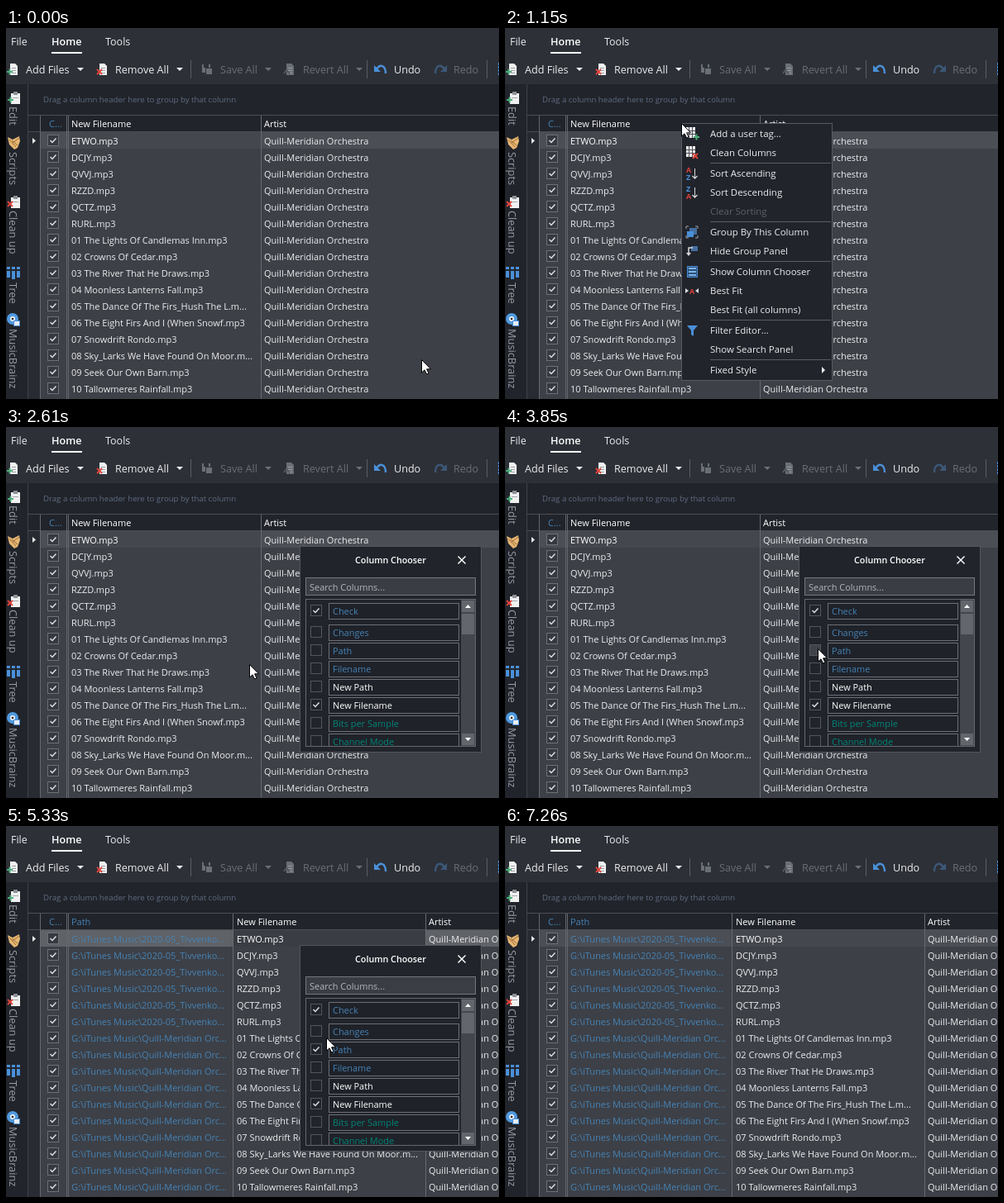
Write an HTML page with a canvas that moves like this. It is 596 px wide and 449 px high and loops after 7490 ms.

```html
<!DOCTYPE html>
<html lang="en">
<head>
<meta charset="utf-8">
<title>Column chooser</title>
<style>
html, body { margin: 0; width: 100%; height: 100%; overflow: hidden; background: #2d3037; }
canvas { display: block; width: 596px; height: 449px; }
</style>
</head>
<body>
<canvas id="stage" width="596" height="449"></canvas>
<script>
const ctx = document.getElementById('stage').getContext('2d');
const LOOP = 7490;
const C = {
  ribbon: '#2d3037', dark: '#21242b', row: '#3d4047', hot: '#4b4e55', line: '#65686e',
  text: '#ececee', white: '#ffffff', dim: '#6a6e75', steel: '#4682b4', teal: '#008577',
  blue: '#4a90d9', red: '#e0443c', green: '#4fae7c'
};

// ---------- drawing helpers ----------
function rect(x, y, w, h, color) {
  ctx.fillStyle = color;
  ctx.fillRect(x, y, w, h);
}
function box(x, y, w, h, fill, border) {
  rect(x, y, w, h, border);
  rect(x + 1, y + 1, w - 2, h - 2, fill);
}
function text(s, x, y, size = 11, color = C.text, weight = 400) {
  ctx.font = `${weight} ${size}px "Open Sans", "Noto Sans", sans-serif`;
  ctx.fillStyle = color;
  ctx.fillText(s, x, y);
}
function trace(points) {
  ctx.beginPath();
  points.forEach(([x, y], i) => i ? ctx.lineTo(x, y) : ctx.moveTo(x, y));
}
function stroke(points, color, width = 1) {
  trace(points);
  ctx.strokeStyle = color;
  ctx.lineWidth = width;
  ctx.stroke();
}
function fill(points, color) {
  trace(points);
  ctx.fillStyle = color;
  ctx.fill();
}
function disc(x, y, r, color) {
  ctx.beginPath();
  ctx.arc(x, y, r, 0, Math.PI * 2);
  ctx.fillStyle = color;
  ctx.fill();
}
function at(x, y, draw) {
  ctx.save();
  ctx.translate(x, y);
  draw();
  ctx.restore();
}
function clip(x, y, w, h, draw) {
  ctx.save();
  ctx.beginPath();
  ctx.rect(x, y, w, h);
  ctx.clip();
  draw();
  ctx.restore();
}
function faded(alpha, draw) {
  if (alpha <= 0) return;
  ctx.save();
  ctx.globalAlpha = alpha;
  draw();
  ctx.restore();
}
const plus = (x, y, c) => { rect(x - 3, y - 1, 7, 2, c); rect(x - .5, y - 3.5, 2, 7, c); };
const cross = (x, y, r, c, w = 2) => {
  stroke([[x - r, y - r], [x + r, y + r]], c, w);
  stroke([[x + r, y - r], [x - r, y + r]], c, w);
};
const dropArrow = (x, y, c) => fill([[x - 4, y - 2], [x + 4, y - 2], [x, y + 2]], c);
function checkbox(x, y, checked, back, border) {
  box(x, y, 14, 14, back, border);
  if (checked) stroke([[x + 3.5, y + 7], [x + 6, y + 9.5], [x + 10.5, y + 4.5]], '#dcdde0', 1.5);
}

// ---------- timeline ----------
// Progress of a move shown in n evenly spaced steps, the first one at t0.
function steps(t, t0, t1, n) {
  if (t < t0) return 0;
  if (n === 1 || t >= t1) return 1;
  return (Math.floor((t - t0) / (t1 - t0) * (n - 1) + 0.05) + 1) / n;
}
const smooth = p => p * p * (3 - 2 * p);

// start, end, steps, x, y
const MOVES = [
  [70, 770, 10, 213, 115],
  [1610, 1920, 5, 293, 275],
  [1990, 2070, 2, 294, 287],
  [3010, 3320, 5, 400, 256],
  [3470, 3700, 4, 380, 281],
  [3770, 3850, 2, 378, 268],
  [5330, 5330, 1, 387, 256],
  [5410, 6020, 9, 556, 163],
  [6100, 6100, 1, 557, 164]
];
function pointer(t) {
  let x = 502, y = 401;
  for (const [t0, t1, n, tx, ty] of MOVES) {
    const p = smooth(steps(t, t0, t1, n));
    x += (tx - x) * p;
    y += (ty - y) * p;
  }
  return { x: Math.round(x), y: Math.round(y) };
}

// ---------- ribbon ----------
function pageIcon(mark, color) {
  fill([[4, 1], [10, 1], [13, 4], [13, 15], [4, 15]], color);
  [6, 9, 12].forEach(y => rect(6, y, 5, 1, '#9a9da3'));
  mark();
}
function arrowIcon(color) {
  ctx.beginPath();
  ctx.moveTo(3, 8);
  ctx.bezierCurveTo(7, 1, 14, 3, 14, 13);
  ctx.strokeStyle = color;
  ctx.lineWidth = 2.4;
  ctx.stroke();
  fill([[0, 3], [0, 11], [8, 11]], color);
}
function diskIcon(color) {
  rect(2, 2, 10, 10, color);
  rect(4, 2, 6, 4, C.ribbon);
  box(6, 6, 9, 9, color, C.ribbon);
}
function ribbon() {
  rect(0, 0, 596, 68, C.ribbon);
  text('File', 6, 21, 12.4);
  text('Home', 55, 21, 12.6, C.white, 600);
  text('Tools', 120, 21, 12.5);
  rect(55, 29, 37, 2, C.white);
  at(1, 42, () => pageIcon(() => plus(3, 11, C.green), '#f2f2f2'));
  at(109, 42, () => pageIcon(() => cross(4, 11, 3, C.red), '#f2f2f2'));
  at(235, 42, () => diskIcon(C.dim));
  at(335, 42, () => pageIcon(() => stroke([[1, 13], [4, 9], [8, 13]], '#55585f', 2), C.dim));
  at(445, 42, () => arrowIcon(C.blue));
  at(533, 42, () => { ctx.scale(-1, 1); arrowIcon('#3c5878'); });
  [['Add Files', 24, 90, C.text], ['Remove All', 132, 210, C.text],
   ['Save All', 259, 317, C.dim], ['Revert All', 359, 427, C.dim],
   ['Undo', 469, 0, C.text], ['Redo', 541, 0, C.dim]].forEach(([s, x, arrow, c]) => {
    text(s, x, 55, 12.6, c);
    if (arrow) dropArrow(arrow, 50, c);
  });
  [223, 436, 581].forEach(x => rect(x, 39, 1, 22, '#5a5d63'));
  for (let y = 42; y < 58; y += 4) rect(595, y, 1, 3, C.blue);
}

// ---------- sidebar ----------
function clipboard(y, mark) {
  rect(6, y + 2, 11, 13, '#f0f0f0');
  rect(9, y, 5, 4, '#8d9096');
  rect(8, y + 7, 7, 1, '#a5a8ad');
  mark(5, y + 10);
}
function sidebar() {
  rect(0, 68, 26, 381, C.dark);
  rect(26, 68, 1, 381, '#3f4249');
  clipboard(77, (x, y) => plus(x, y, C.green));
  clipboard(203, (x, y) => cross(x, y, 3, C.red));
  fill([[2, 132], [8, 135], [16, 131], [17, 137], [14, 145], [10, 147], [4, 141]], '#e6b673');
  [[4, 135, 12, 144], [7, 136, 14, 142], [16, 133, 8, 139]]
    .forEach(([a, b, c, d]) => stroke([[a, b], [c, d]], '#9a6d38'));
  [1, 7, 13].forEach((x, i) => {
    rect(x, 289, 4, 3, C.blue);
    rect(x, 294, 4, i === 1 ? 10 : 8, C.blue);
  });
  disc(8, 352, 7, '#4f9ae0');
  disc(8, 352, 3, '#f2f2f2');
  disc(8, 352, 1.3, C.dark);
  box(9, 354, 8, 7, '#e9eef4', C.blue);
  [['Edit', 95], ['Scripts', 150], ['Clean up', 221], ['Tree', 308], ['MusicBrainz', 364]]
    .forEach(([s, y]) => at(4, y, () => {
      ctx.rotate(Math.PI / 2);
      text(s, 0, 0, 12.8, '#999ca2');
    }));
}

// ---------- grid ----------
const ARTIST = 'Quill-Meridian Orchestra';
const FILES = [
  'ETWO.mp3', 'DCJY.mp3', 'QVVJ.mp3', 'RZZD.mp3', 'QCTZ.mp3', 'RURL.mp3',
  '01 The Lights Of Candlemas Inn.mp3', '02 Crowns Of Cedar.mp3',
  '03 The River That He Draws.mp3', '04 Moonless Lanterns Fall.mp3',
  '05 The Dance Of The Firs_Hush The L.m...', '06 The Eight Firs And I (When Snowf.mp3',
  '07 Snowdrift Rondo.mp3', '08 Sky_Larks We Have Found On Moor.m...',
  '09 Seek Our Own Barn.mp3', '10 Tallowmeres Rainfall.mp3'
];
const pathOf = i => 'G:\\iTunes Music\\' + (i < 6 ? '2020-05_Tivvenko...' : 'Quill-Meridian Orc...');

function grid(withPath, bright, headerHot) {
  rect(26, 68, 570, 381, C.dark);
  text('Drag a column header here to group by that column', 45, 90, 9.65, '#5f6b7f');
  rect(26, 105, 570, 1, '#4a4d54');
  const nameX = withPath ? 275 : 76, artistX = nameX + 232;
  if (headerHot) rect(nameX, 106, 231, 19, '#31343b');
  rect(26, 125, 570, 1, '#4a4d54');
  rect(42, 126, 554, 323, C.row);
  rect(27, 126, 14, 323, '#282b32');
  rect(42, 126, 554, 20, bright ? '#5f6267' : C.hot);
  rect(nameX, 126, 232, 20, bright ? '#3a3d44' : '#44474e');

  text('C...', 52, 120, 11, C.steel);
  if (withPath) text('Path', 79, 120, 11, C.steel);
  text('New Filename', nameX + (withPath ? 4 : 3), 120, 11, C.white);
  text('Artist', artistX + 4, 120, 11, C.white);

  FILES.forEach((name, i) => {
    const y = 141 + i * 20;
    checkbox(50, y - 12, true, '#363940', '#6d7076');
    if (withPath) clip(76, y - 14, 197, 20, () => text(pathOf(i), 79, y, 11, C.steel));
    clip(nameX, y - 14, 231, 20,
      () => text(name, nameX + (withPath ? 4 : 3), y, 11, i ? C.text : C.white));
    text(ARTIST, artistX + 4, y, 11);
  });
  [41, 73, 75, artistX].concat(withPath ? [274] : [])
    .forEach(x => rect(x, 106, 1, 343, C.line));
  fill([[32, 133], [36, 136.5], [32, 140]], C.text);
}

// ---------- context menu ----------
function tableIcon(mark) {
  rect(-7, -8, 11, 13, '#f2f2f2');
  [-4, 0].forEach(y => rect(-7, y, 11, 1, '#4a4d54'));
  [-4, 0].forEach(x => rect(x, -8, 1, 13, '#4a4d54'));
  mark();
}
function sortIcon(top, bottom) {
  text(top, -7, -1, 9, top === 'A' ? C.red : C.blue, 700);
  text(bottom, -7, 8, 9, bottom === 'A' ? C.red : C.blue, 700);
  rect(3, -6, 1, 12, '#d8d9dc');
  stroke([[0.5, 3], [3.5, 6], [6.5, 3]], '#d8d9dc', 1.3);
}
const ICONS = {
  add: () => tableIcon(() => plus(5, 4, C.green)),
  clean: () => tableIcon(() => cross(4, 4, 3, C.red)),
  asc: () => sortIcon('A', 'Z'),
  desc: () => sortIcon('Z', 'A'),
  group: () => {
    rect(-3, -5, 9, 8, '#456f9f');
    rect(-6, -1, 8, 7, C.blue);
    [[-7, -7, 1, 1], [7, -7, -1, 1], [-7, 7, 1, -1], [7, 7, -1, -1]].forEach(([x, y, a, b]) =>
      stroke([[x + 3 * a, y], [x, y], [x, y + 3 * b]], '#a0a3a8'));
  },
  hide: () => {
    rect(-1, -6, 8, 6, '#456f9f');
    stroke([[1, -4], [-4, -4], [-4, 4]], '#d8d9dc', 1.5);
    fill([[-7, 2], [-1, 2], [-4, 6]], '#d8d9dc');
  },
  list: () => {
    box(-6, -7, 13, 14, '#2d4f75', C.blue);
    [-4, 0, 4].forEach(y => rect(-4, y - 1, 9, 2, '#7bb4ee'));
  },
  fit: () => {
    text('A', -3, 3.5, 9, C.red, 700);
    fill([[-8, -3], [-4, 0], [-8, 3]], '#d8d9dc');
    fill([[8, -3], [4, 0], [8, 3]], '#d8d9dc');
  },
  filter: () => fill([[-6, -6], [7, -6], [2, 0], [2, 7], [-1, 5], [-1, 0]], C.blue)
};
const MENU = [
  [128, 'Add a user tag...', 'add'], [151, 'Clean Columns', 'clean'],
  [176, 'Sort Ascending', 'asc'], [199, 'Sort Descending', 'desc'], [222, 'Clear Sorting'],
  [247, 'Group By This Column', 'group'], [270, 'Hide Group Panel', 'hide'],
  [295, 'Show Column Chooser', 'list'], [318, 'Best Fit', 'fit'],
  [341, 'Best Fit (all columns)'], [366, 'Filter Editor...', 'filter'],
  [389, 'Show Search Panel'], [414, 'Fixed Style']
];
function menu(mouse) {
  box(213, 115, 183, 312, C.dark, '#565960');
  [163, 234, 282, 353, 401].forEach(y => rect(248, y, 146, 1, '#5a5d63'));
  MENU.forEach(([y, label, icon]) => {
    const disabled = label === 'Clear Sorting';
    const hot = !disabled && mouse.x > 216 && Math.abs(mouse.y - y) <= 11;
    if (hot) rect(214, y - 11, 181, 22, C.hot);
    if (icon) at(226, y, ICONS[icon]);
    text(label, 248, y + 4, 11.45, disabled ? '#5d6168' : C.text);
  });
  fill([[383, 410], [387, 414], [383, 418]], C.text);
}

// ---------- column chooser ----------
const COLUMNS = [
  [223, 'Check', C.steel], [249, 'Changes', C.steel], [271, 'Path', C.steel],
  [293, 'Filename', C.steel], [315, 'New Path', C.white], [337, 'New Filename', C.white],
  [359, 'Bits per Sample', C.teal], [381, 'Channel Mode', C.teal]
];
function chooser(mouse, pathChecked) {
  box(355, 144, 220, 250, C.dark, '#53565d');
  if (mouse.x > 528 && mouse.y < 177) rect(528, 145, 46, 32, C.hot);
  text('Column Chooser', 422, 165, 10.75, C.white, 600);
  cross(551, 161, 4.5, C.white, 1.4);
  box(362, 182, 206, 22, '#3a3d44', '#74777d');
  text('Search Columns...', 367, 198, 10.95, '#b4b6ba');
  box(362, 208, 206, 179, C.dark, C.line);

  clip(363, 209, 187, 177, () => COLUMNS.forEach(([y, label, color]) => {
    const inRow = Math.abs(mouse.y - y) <= 10;
    const checked = label === 'Check' || label === 'New Filename' || (label === 'Path' && pathChecked);
    const boxHot = inRow && mouse.x >= 366 && mouse.x < 384;
    checkbox(368, y - 8, checked, boxHot ? '#3f4249' : C.dark, '#53565c');
    const hot = inRow && mouse.x >= 390 && mouse.x < 548;
    box(390, y - 10, 158, 20, hot ? '#3a3d44' : '#1f2229', '#6c6f75');
    text(label, 395, y + 4, 10.95, color);
  }));

  rect(550, 209, 17, 177, '#43464d');
  rect(551, 210, 15, 14, '#63666c');
  rect(551, 226, 15, 25, '#63666c');
  rect(551, 371, 15, 14, '#63666c');
  fill([[555, 219], [562, 219], [558.5, 215]], C.white);
  fill([[555, 376], [562, 376], [558.5, 380]], C.white);
}

function cursor({ x, y }) {
  at(x, y, () => {
    const shape = [[.5, .5], [.5, 16], [4, 12.8], [6.6, 18], [9, 17], [6.6, 11.8], [11.5, 11.8], [.5, .5]];
    fill(shape, C.white);
    stroke(shape, '#000', 1);
  });
}

function render(t) {
  const mouse = pointer(t);
  const menuAlpha = t < 2530 ? steps(t, 1000, 1150, 3) : 0;
  const chooserAlpha = t < 6800 ? steps(t, 2530, 2610, 2) : 1 - steps(t, 6800, 6880, 2);
  const pathChecked = t >= 4250;
  const withPath = t >= 4320;
  const headerHot = t < 1150 && mouse.x < 307 && mouse.y < 126;

  ribbon();
  grid(withPath, withPath && t < 6880, headerHot);
  sidebar();
  faded(menuAlpha, () => menu(mouse));
  faded(chooserAlpha, () => chooser(mouse, pathChecked));
  faded(1 - steps(t, 6800, 7260, 7), () => cursor(mouse));
}

function tick(now) {
  render(now % LOOP);
  requestAnimationFrame(tick);
}
render(0);
requestAnimationFrame(tick);
</script>
</body>
</html>
```
